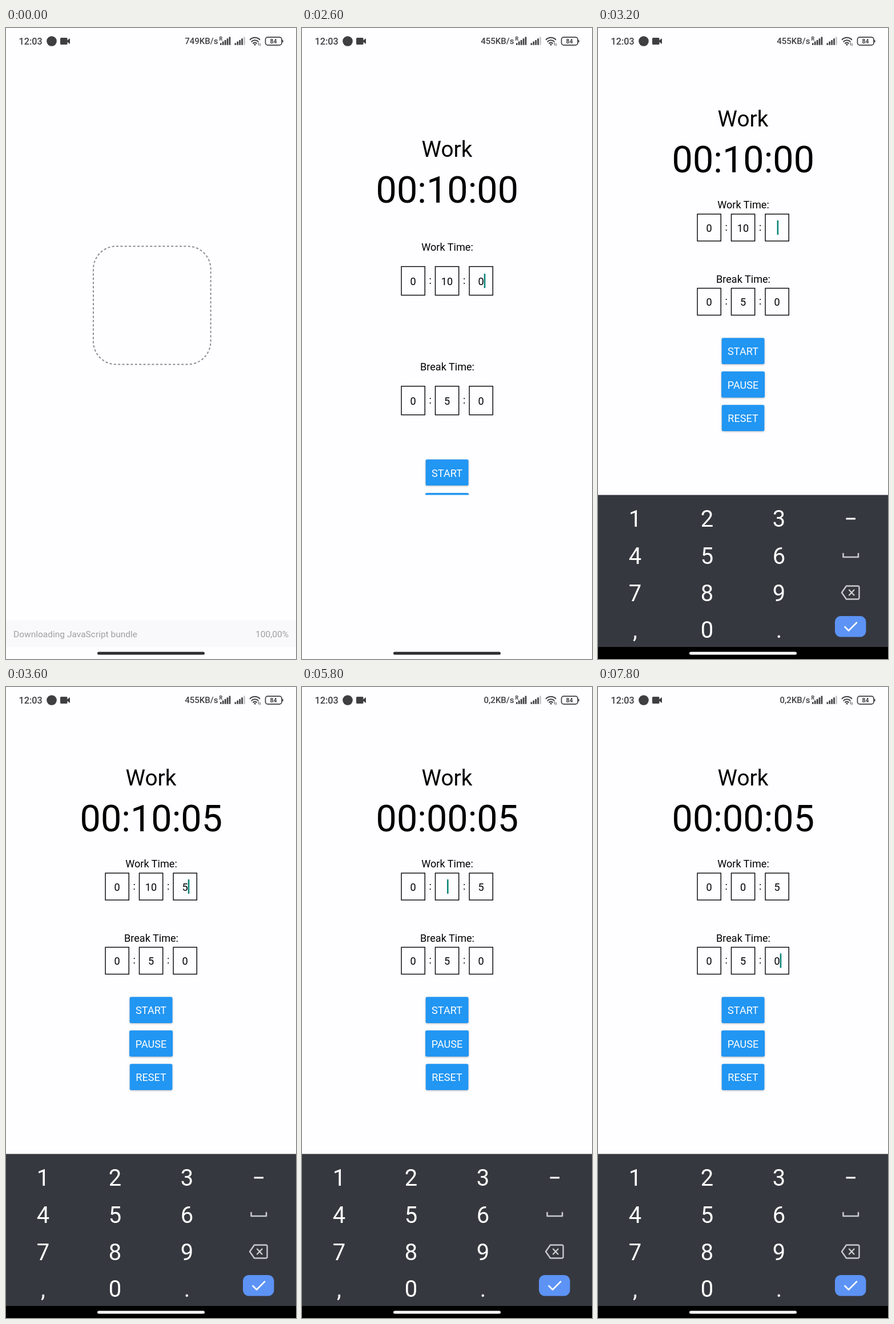
Write an HTML page that moves like this. It is 508x1102 px and loops after 8 s.

```html
<!DOCTYPE html>
<html lang="en">
<head>
<meta charset="utf-8">
<title>Work timer</title>
<style>
  html, body { margin: 0; width: 100%; height: 100%; overflow: hidden; background: #fefdff; }
  svg { display: block; width: 100vw; height: 100vh; font-family: Roboto, sans-serif; }
  .mid { text-anchor: middle; }
  .end { text-anchor: end; }
  .btn { fill: #2196f3; filter: drop-shadow(0 1.6px 1.6px rgba(0, 0, 0, .28)); }
  .line { fill: none; stroke-linecap: round; stroke-linejoin: round; }
</style>
</head>
<body>
<svg id="stage" viewBox="0 0 508 1102" xmlns="http://www.w3.org/2000/svg">
  <defs><clipPath id="view"><rect id="viewBox" width="508" height="1102"/></clipPath></defs>
  <rect width="508" height="1102" fill="#fefdff"/>

  <g id="splash">
    <rect x="153" y="381.2" width="205.6" height="206.3" rx="40" fill="none" stroke="#8d8c90" stroke-width="2" stroke-dasharray="4 3.4"/>
    <g id="bar" font-size="15.5" fill="#a09fa3">
      <rect y="1034" width="508" height="47" fill="#f9f8fa"/>
      <text x="13" y="1064">Downloading JavaScript bundle</text>
      <text class="end" x="495" y="1064">100,00%</text>
    </g>
  </g>

  <g id="app" clip-path="url(#view)"></g>
  <g id="keys"></g>
  <rect id="nav" y="1081" width="508" height="21"/>
  <rect id="pill" x="160" y="1089.5" width="188" height="5" rx="2.5"/>

  <g id="status" fill="#3f3f42">
    <text x="22.5" y="28.6" font-size="16.2" font-weight="500">12:03</text>
    <circle cx="80" cy="23" r="8.8"/>
    <path d="M96.500 17h9.500q1.500 0 1.500 1.500v3l4.500-3.500v10l-4.500-3.500v3q0 1.500-1.500 1.500h-9.500q-1.500 0-1.500-1.500v-9q0-1.500 1.500-1.500z"/>
    <text id="speed" class="end" x="371.500" y="28.200" font-size="15" font-weight="500"></text>
    <text x="373.500" y="21.500" font-size="9" font-weight="700">R</text>
    <g id="bars"></g>
    <g class="line" stroke="#3f3f42" stroke-width="2">
      <path d="M427.600 20.300a12 12 0 0 1 16.800 0M430.300 23.700a8 8 0 0 1 11.400 0M433 26.800a4.400 4.400 0 0 1 6 0"/>
      <path d="M442.300 26v4M445 27v4" stroke-width="1"/>
      <rect x="454.500" y="16.200" width="28.500" height="13.600" rx="3.800" stroke-width="1.700"/>
      <path d="M484.800 21.500v3" stroke-width="1.600"/>
    </g>
    <circle cx="436" cy="29" r="1.600"/>
    <text class="mid" x="468.500" y="26.800" font-size="10.500" font-weight="700">84</text>
  </g>
</svg>
<script>
const LOOP = 8000, TICK = 200;
const $ = id => document.getElementById(id);

function add(parent, tag, attrs, text = '') {
  const el = document.createElementNS('http://www.w3.org/2000/svg', tag);
  set(el, attrs);
  el.textContent = text;
  return parent.appendChild(el);
}
function set(el, attrs) {
  for (const k in attrs) el.setAttribute(k, attrs[k]);
}
const label = (parent, x, size, text, fill = '#000') =>
  add(parent, 'text', { class: 'mid', x, 'font-size': size, fill }, text);

// Signal strength
[[375, 5], [400.500, 4]].forEach(([x, lit]) => {
  for (let i = 0; i < 5; i++) {
    const h = 3.500 + i * 2.700;
    add($('bars'), 'rect', { x: x + i * 3.900, y: 29.800 - h, width: 2.700, height: h, rx: .6, opacity: i < lit ? 1 : .3 });
  }
});

// App with two vertical arrangements
const LAYOUTS = {
  tall: { title: 225, clock: 304.5, labels: [388.5, 597.5], boxes: [416.6, 625.6], boxH: 50, start: 753.5 },
  short: { title: 172, clock: 251.5, labels: [315, 444.5], boxes: [325, 454.5], boxH: 47, start: 541.3 }
};
const CENTERS = [194.6, 254, 313.6];
const app = $('app');
const title = label(app, 254, 38.8, 'Work');
const clock = label(app, 254.3, 64.7, '');
const rows = ['Work Time:', 'Break Time:'].map(name => ({
  name: label(app, 254.5, 18.1, name),
  boxes: CENTERS.map(x => add(app, 'rect', { x: x - 20.5, width: 41.2, fill: 'none', stroke: '#000', 'stroke-width': 1.4 })),
  values: CENTERS.map(x => label(app, x, 18.1, '')),
  colons: [224.6, 284.1].map(x => label(app, x, 18.1, ':'))
}));
const buttons = [['START', 75], ['PAUSE', 76], ['RESET', 74.6]].map(([name, width]) => ({
  box: add(app, 'rect', { class: 'btn', x: 254.1 - width / 2, width, height: 45.6, rx: 2.6 }),
  name: label(app, 254, 18.1, name, '#fff')
}));
const caret = add(app, 'rect', { width: 2.6, height: 25, fill: '#0b8577' });

function arrange(l) {
  title.setAttribute('y', l.title);
  clock.setAttribute('y', l.clock);
  rows.forEach((row, i) => {
    const top = l.boxes[i], base = top + l.boxH / 2 + 7;
    row.name.setAttribute('y', l.labels[i]);
    row.boxes.forEach(b => set(b, { y: top, height: l.boxH }));
    row.values.forEach(v => v.setAttribute('y', base));
    row.colons.forEach(c => c.setAttribute('y', base - 1.7));
  });
  buttons.forEach((b, i) => {
    const y = l.start + i * 58.5;
    b.box.setAttribute('y', y);
    b.name.setAttribute('y', y + 30);
  });
}

// Number pad
const keys = $('keys');
add(keys, 'rect', { y: 815.5, width: 508, height: 290, fill: '#36383f' });
['123', '456', '789', ',0.'].forEach((row, r) => [...row].forEach((ch, c) =>
  label(keys, 65 + c * 126, 40, ch, '#fff').setAttribute('y', 871.3 + r * 64.6)));
const icon = (d, stroke, width) => add(keys, 'path', { class: 'line', d, stroke, 'stroke-width': width });
add(keys, 'rect', { x: 434.5, y: 855.5, width: 16.5, height: 3, fill: '#fff' });
icon('M429.500 918v6h26.500v-6', '#c9cacd', 2.6).setAttribute('stroke-linecap', 'butt');
icon('M435 974.500h20q2.500 0 2.500 2.500v18q0 2.500-2.500 2.500h-20l-8-11.500zM440 981.500l8.500 9M448.500 981.500l-8.500 9', '#c9cacd', 2.4);
add(keys, 'rect', { x: 415, y: 1027, width: 54.5, height: 36.5, rx: 10, fill: '#5c93f5' });
icon('M432.500 1046l6.500 6.500 14-14', '#fff', 2.6);

// Each step overrides part of the state; caret is [row, column]
const STEPS = [
  [0, { bar: 1, app: 0, speed: '749KB/s', work: ['0', '10', '0'], caret: null, layout: 'tall', clip: 1102, pad: null }],
  [400, { bar: .5 }],
  [600, { bar: 0 }],
  [800, { app: .25 }],
  [1000, { app: .6 }],
  [1200, { app: .9 }],
  [1400, { app: 1 }],
  [1600, { speed: '455KB/s' }],
  [2400, { caret: [0, 2] }],
  [2600, { clip: 815.5 }],
  [2800, { layout: 'short', pad: 4.5 }],
  [3000, { pad: 0 }],
  [3200, { work: ['0', '10', ''] }],
  [3600, { work: ['0', '10', '5'] }],
  [4200, { caret: null }],
  [4600, { caret: [0, 1] }],
  [5000, { caret: null }],
  [5600, { caret: [0, 1], work: ['0', '1', '5'] }],
  [5800, { work: ['0', '', '5'], speed: '0,2KB/s' }],
  [6200, { work: ['0', '0', '5'] }],
  [6800, { caret: null }],
  [7200, { caret: [0, 1] }],
  [7800, { caret: [1, 2] }]
];
const stateAt = t => Object.assign({}, ...STEPS.filter(s => s[0] <= t).map(s => s[1]));

function draw(t) {
  const s = stateAt(t), l = LAYOUTS[s.layout], padded = s.pad !== null;
  const fields = [s.work, ['0', '5', '0']];
  arrange(l);
  $('bar').setAttribute('opacity', s.bar);
  $('splash').setAttribute('opacity', 1 - s.app);
  app.setAttribute('opacity', s.app);
  $('viewBox').setAttribute('height', s.clip);
  $('speed').textContent = s.speed;
  clock.textContent = s.work.map(v => v.padStart(2, '0')).join(':');
  rows.forEach((row, r) => row.values.forEach((v, c) => v.textContent = fields[r][c]));

  caret.setAttribute('visibility', s.caret ? 'visible' : 'hidden');
  if (s.caret) {
    const [r, c] = s.caret;
    set(caret, { x: CENTERS[c] + fields[r][c].length * 5.1, y: l.boxes[r] + l.boxH / 2 - 12.5 });
  }

  keys.setAttribute('visibility', padded ? 'visible' : 'hidden');
  keys.setAttribute('transform', `translate(0 ${s.pad || 0})`);
  set($('nav'), { y: 1081 + (s.pad || 0), visibility: padded ? 'visible' : 'hidden' });
  $('pill').setAttribute('fill', padded ? '#fff' : '#2e2e30');
}

let shown = -1;
function frame() {
  const t = Math.floor(performance.now() % LOOP / TICK) * TICK;
  if (t !== shown) draw(shown = t);
  requestAnimationFrame(frame);
}
frame();
</script>
</body>
</html>
```
